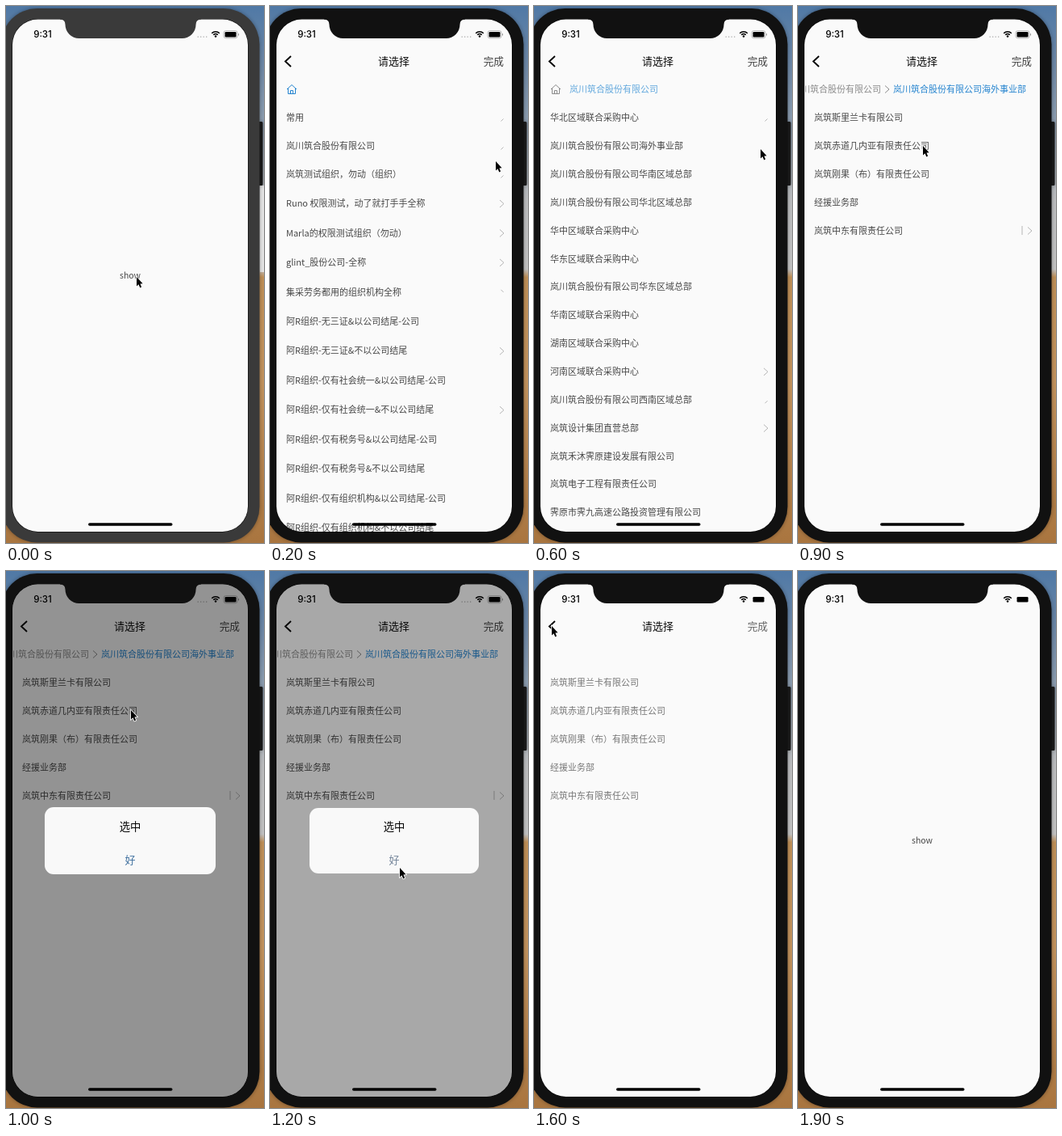
Animation of 320x664 px, one loop 2 s. Source, as an HTML page with a canvas:

```html
<!DOCTYPE html>
<html lang="zh">
<head>
<meta charset="utf-8">
<style>
  html, body { margin: 0; width: 100%; height: 100%; overflow: hidden; }
  canvas { display: block; }
</style>
</head>
<body>
<canvas id="stage" width="320" height="664"></canvas>
<script>
const ctx = document.getElementById('stage').getContext('2d');
const STEP = 100, STEPS = 20;
const CJK = '"Noto Sans CJK SC", "Noto Sans CJK", sans-serif';
const BLUE = '#2584cf', INK = '#484848', FADED_INK = '#777';

const company = '岚川筑合股份有限公司';
const overseas = company + '海外事业部';

// Arrow styles: "f" full, "l" lower stroke only, "u" upper stroke only, "b" with a bar, "-" none.
const lists = {
  root: {
    y: i => i < 3 ? 138 + 35 * i : 244 + 36.45 * (i - 3),
    arrows: 'lllfffu-f-f----',
    rows: ['常用', company, '岚筑测试组织，勿动（组织）', 'Runo 权限测试，动了就打手手全称',
      'Marla的权限测试组织（勿动）', 'glint_股份公司-全称', '集采劳务都用的组织机构全称',
      ...['无三证', '仅有社会统一', '仅有税务号', '仅有组织机构'].flatMap(kind =>
        [`阿R组织-${kind}&以公司结尾-公司`, `阿R组织-${kind}&不以公司结尾`])]
  },
  group: {
    y: i => 138 + 34.87 * i,
    arrows: 'l--------flf---',
    rows: ['华北区域联合采购中心', overseas, company + '华南区域总部', company + '华北区域总部',
      '华中区域联合采购中心', '华东区域联合采购中心', company + '华东区域总部', '华南区域联合采购中心',
      '湖南区域联合采购中心', '河南区域联合采购中心', company + '西南区域总部', '岚筑设计集团直营总部',
      '岚筑禾沐霁原建设发展有限公司', '岚筑电子工程有限责任公司', '霁原市霁九高速公路投资管理有限公司']
  },
  branch: {
    y: i => 138 + 34.87 * i,
    arrows: '----b',
    rows: ['岚筑斯里兰卡有限公司', '岚筑赤道几内亚有限责任公司', '岚筑刚果（布）有限责任公司',
      '经援业务部', '岚筑中东有限责任公司']
  }
};

// Pointer tip at each step; null hides it.
const pointer = [[162, 335], [162, 335], [280, 192], [281, 177], [281, 177], [281, 177], [281, 177],
  [281, 177], [281, 177], [155, 173], [155, 172], [161, 367], [161, 367], [63, 23], null, null,
  [22, 68], [24, 78], [26, 108], null];

function box(x, y, w, h, r, color) {
  ctx.fillStyle = color;
  ctx.beginPath();
  ctx.roundRect(x, y, w, h, r);
  ctx.fill();
}

function line(points, color, width = 1) {
  ctx.strokeStyle = color;
  ctx.lineWidth = width;
  ctx.beginPath();
  points.forEach(p => ctx.lineTo(...p));
  ctx.stroke();
}

// Places text with its ideographic centre at y.
function text(str, x, y, { size = 11, color = INK, weight = 300, align = 'left', family = CJK } = {}) {
  ctx.font = `${weight} ${size}px ${family}`;
  ctx.fillStyle = color;
  ctx.textAlign = align;
  ctx.fillText(str, x, y + size * 0.38);
}

function arrow(x, y, style, color = '#b5b5b5') {
  const upper = [x - 2.5, y - 4.5], tip = [x + 2.5, y], lower = [x - 2.5, y + 4.5];
  if (style === 'l') line([[x - 1, y + 4], [x + 2, y + 1]], color);
  else if (style === 'u') line([[x - 1, y - 3], [x + 2, y]], color);
  else if (style !== '-') line([upper, tip, lower], color);
  if (style === 'b') line([[x - 9.5, y - 6], [x - 9.5, y + 5]], color);
}

function desktop() {
  const sky = ctx.createLinearGradient(0, 0, 0, 664);
  [[0, '#5079a6'], [.12, '#7089a6'], [.25, '#98a5b3'], [.36, '#bcbdbf'], [.49, '#c3c3c3'],
    [.505, '#c09058'], [.7, '#c3935e'], [1, '#a9753f']].forEach(s => sky.addColorStop(...s));
  ctx.fillStyle = sky;
  ctx.fillRect(0, 0, 320, 664);
}

function phoneBody(color) {
  ctx.save();
  ctx.shadowColor = 'rgba(0,0,0,.35)';
  ctx.shadowBlur = 5;
  box(313, 143, 5.5, 79, 1.5, '#1a1a1a');
  box(-6, 3, 320.5, 660.5, 44.5, color);
  ctx.restore();
  box(7.5, 16, 293, 634.5, 32, '#000');
}

function notch(color) {
  ctx.fillStyle = color;
  ctx.beginPath();
  ctx.moveTo(67, 15);
  ctx.lineTo(67, 16.5);
  ctx.quadraticCurveTo(73.5, 16.5, 73.5, 23);
  ctx.arcTo(73.5, 40, 91, 40, 17);
  ctx.arcTo(235.5, 40, 235.5, 23, 17);
  ctx.lineTo(235.5, 23);
  ctx.quadraticCurveTo(235.5, 16.5, 242, 16.5);
  ctx.lineTo(242, 15);
  ctx.fill();
}

function statusBar(detailed) {
  text('9:31', 45.5, 35, { size: 11.5, color: '#000', weight: 500, align: 'center', family: 'Inter, sans-serif' });
  ctx.strokeStyle = '#000';
  ctx.lineWidth = 1.6;
  [6.8, 3.9].forEach(r => {
    ctx.beginPath();
    ctx.arc(260, 38.5, r, -Math.PI * .75, -Math.PI * .25);
    ctx.stroke();
  });
  box(258.7, 36.2, 2.6, 2.6, 1.3, '#000');
  box(271.5, 32, 14, 6.5, 1.3, '#000');
  if (!detailed) return;
  ctx.strokeStyle = '#aaa';
  ctx.lineWidth = .8;
  ctx.beginPath();
  ctx.roundRect(270, 30.6, 17, 9.2, 2.6);
  ctx.stroke();
  box(288, 34, 1, 2.5, .5, '#999');
  for (let i = 0; i < 4; i++) box(237.5 + i * 3.5, 37.5, 1.3, 1.3, 0, '#aaa');
}

function home(color) {
  line([[21, 103], [27, 97.5], [33, 103]], color);
  line([[22.5, 102], [22.5, 108.5], [31.5, 108.5], [31.5, 102]], color);
  line([[25.5, 108], [25.5, 104.5], [28.5, 104.5], [28.5, 108]], color);
}

function breadcrumb(page, faded) {
  if (page === 'root') home(BLUE);
  else if (page === 'group') {
    home('#8b8b8b');
    text(company, 44, 103, { color: '#62a8dd' });
  } else if (!faded) {
    text(company, -7, 103, { color: '#8b8b8b' });
    arrow(110.5, 103, 'f', '#8b8b8b');
    text(overseas, 118, 103, { color: BLUE });
  }
}

function picker(page, faded) {
  line([[26, 62], [19, 68.5], [26, 75]], '#000', 1.9);
  text('请选择', 153.5, 68.5, { size: 13, color: '#111', weight: 400, align: 'center' });
  text('完成', 290, 68.5, { size: 12.7, color: faded ? '#666' : '#444', align: 'right' });
  breadcrumb(page, faded);
  const { rows, arrows, y } = lists[page];
  rows.forEach((row, i) => {
    text(row, 20, y(i), { color: faded ? FADED_INK : INK });
    arrow(287.5, y(i) + .5, faded ? '-' : arrows[i] || '-');
  });
}

function alertBox(closing) {
  ctx.fillStyle = `rgba(0,0,0,${closing ? .33 : .41})`;
  ctx.fillRect(8, 16, 292, 634);
  const inset = closing ? 1 : 0;
  box(48 + inset, 292 + inset, 212 - 2 * inset, 83 - 2 * inset, 11, '#f9f9f9');
  text('选中', 154, 316, { size: 13.3, color: '#000', weight: 400, align: 'center' });
  text('好', 154, 357, { size: 13, color: closing ? '#74859a' : '#41719f', align: 'center' });
}

function cursor([x, y]) {
  const shape = [[0, 0], [0, 11.4], [2.5, 9.2], [4.3, 13.4], [6.1, 12.6], [4.4, 8.5], [7.6, 8.3]];
  ctx.beginPath();
  shape.forEach(([dx, dy]) => ctx.lineTo(x + dx, y + dy));
  ctx.closePath();
  ctx.strokeStyle = '#fff';
  ctx.lineWidth = 1.6;
  ctx.stroke();
  ctx.fillStyle = '#000';
  ctx.fill();
}

function pageAt(step) {
  if (step < 1 || step >= 17) return 'start';
  return step < 4 ? 'root' : step < 8 ? 'group' : 'branch';
}

function draw(step) {
  const page = pageAt(step), faded = step >= 13;
  const bezel = step === 0 ? '#3a3a3a' : '#111';
  desktop();
  if (step === 0) box(315, 222, 5, 107, 0, '#e6e6e6');
  phoneBody(bezel);

  ctx.save();
  ctx.beginPath();
  ctx.roundRect(8, 16.5, 292, 633.5, 31.5);
  ctx.clip();
  ctx.fillStyle = '#fafafa';
  ctx.fillRect(0, 0, 320, 664);
  statusBar(!faded);
  if (page === 'start') text('show', 154, 333, { size: 10.5, align: 'center' });
  else picker(page, faded);
  if (step >= 10 && step <= 12) alertBox(step === 12);
  ctx.restore();

  notch(bezel);
  box(102, 639.2, 104.5, 3.6, 1.8, '#000');
  if (pointer[step]) cursor(pointer[step]);
}

const start = performance.now();
function tick() {
  draw(Math.floor((performance.now() - start) / STEP) % STEPS);
  requestAnimationFrame(tick);
}
tick();
</script>
</body>
</html>
```
